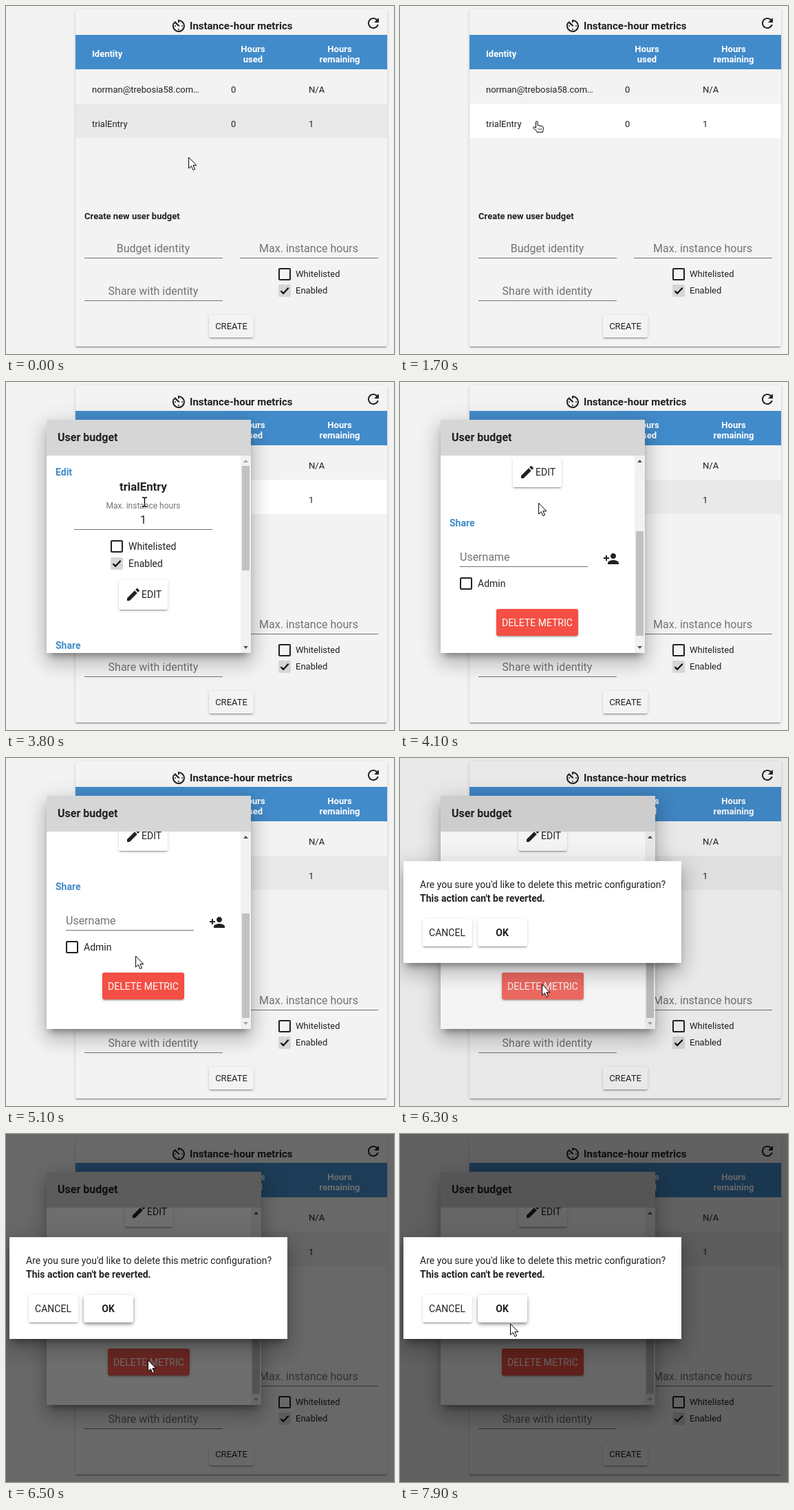
These frames come from a looping animation (564x506 px, 8000 ms). An HTML page:

```html
<!DOCTYPE html>
<html lang="en">
<head>
<meta charset="utf-8">
<title>Instance-hour metrics</title>
<style>
  html, body { margin: 0; width: 100%; height: 100%; overflow: hidden; background: #f3f3f3; }
  #stage { position: relative; width: 564px; height: 506px; overflow: hidden;
    font-family: Roboto, sans-serif; color: #212121; }
  #stage div, #stage svg { position: absolute; }
  .text { line-height: 20px; white-space: pre; }
  .mid { width: 240px; text-align: center; }
  .bold { font-weight: 700; }
  .white { color: #fff; }
  .blue { color: #428bca; }
  .hint { color: #737373; }
  .card, .btn { box-shadow: 0 2px 2px rgba(0,0,0,.14), 0 1px 5px rgba(0,0,0,.12), 0 3px 1px -2px rgba(0,0,0,.2); }
  .card { background: #f3f3f3; border-radius: 2px; }
  .btn { border-radius: 3px; background: #fff; overflow: hidden; }
  .raised { box-shadow: 0 4px 5px rgba(0,0,0,.14), 0 1px 10px rgba(0,0,0,.12), 0 2px 4px -1px rgba(0,0,0,.4); }
  .pale { background: #f3f3f3; }
  .red { background: #f44f44; }
  .head { background: #428bca; }
  .line { background: #737373; }
  .check { box-sizing: border-box; border: 2px solid #212121; border-radius: 2px; }
  .on { border: 0; background: #d6d6d6; }
  .dialog { background: #fff;
    box-shadow: 0 16px 24px 2px rgba(0,0,0,.14), 0 6px 30px 5px rgba(0,0,0,.12), 0 8px 10px -5px rgba(0,0,0,.4); }
  .bar { background: #d6d6d6; }
  .clip { overflow: hidden; }
  .track { background: #f1f1f1; }
  .thumb { background: #c1c1c1; }
  .ripple { border-radius: 50%; background: #fff; }
  .shade { background: #000; }
</style>
</head>
<body>
<div id="stage"></div>
<script>
const LOOP = 8000;
const stage = document.getElementById('stage');

function box(parent, x, y, w, h, cls = '') {
  const el = document.createElement('div');
  el.className = cls;
  el.style.cssText = `left:${x}px;top:${y}px;width:${w}px;height:${h}px`;
  return parent.appendChild(el);
}

// y is the middle of the line; "mid" text is centred on x
function text(parent, str, x, y, size, cls = '') {
  const el = document.createElement('div');
  const left = cls.includes('mid') ? x - 120 : x;
  el.className = 'text ' + cls;
  el.textContent = str;
  el.style.cssText = `left:${left}px;top:${y - 10}px;font-size:${size}px`;
  return parent.appendChild(el);
}

function svg(parent, x, y, w, h, inner) {
  parent.insertAdjacentHTML('beforeend',
    `<svg width="${w}" height="${h}" viewBox="0 0 ${w} ${h}" style="left:${x}px;top:${y}px" fill="#212121">${inner}</svg>`);
  return parent.lastElementChild;
}

const icon = (parent, x, y, d) => svg(parent, x, y, 24, 24, `<path d="${d}"/>`);

function field(parent, hint, x, y) {
  text(parent, hint, x + 100, y - 13, 16, 'mid hint');
  box(parent, x, y, 201, 1, 'line');
}

function check(parent, label, x, y, size, on, gap) {
  const el = box(parent, x, y, 18, 18, 'check' + (on ? ' on' : ''));
  if (on) svg(el, 0, 0, 18, 18, '<path d="M3.5 9.2l3.6 3.6 7.6-8" fill="none" stroke="#111" stroke-width="2.2"/>');
  text(parent, label, x + gap, y + 9, size);
}

const EMAIL = 'norman@trebosia58.com…';
const USER = 'trialEntry';

// Metrics card
box(stage, 101, 5, 453, 490, 'card');
svg(stage, 239, 17, 24, 24, `
  <path d="M12 7V4a8 8 0 1 1-6.2 2.9" fill="none" stroke="#212121" stroke-width="2"/>
  <path d="M6.6 4.8l6.8 6.8L12 13 5.6 7.2z"/>
  <circle cx="12" cy="17" r="1"/><circle cx="17" cy="12" r="1"/><circle cx="7" cy="12" r="1"/>`);
text(stage, 'Instance-hour metrics', 267, 29, 15, 'bold');
icon(stage, 522, 13, 'M17.65 6.35C16.2 4.9 14.21 4 12 4c-4.42 0-7.99 3.58-7.99 8s3.57 8 7.99 8c3.73 0 6.84-2.55 7.73-6h-2.08c-.82 2.33-3.04 4-5.65 4-3.31 0-6-2.69-6-6s2.69-6 6-6c1.66 0 3.14.69 4.22 1.78L13 11h7V4l-2.35 2.35z');

box(stage, 101, 42, 453, 50, 'head');
text(stage, 'Identity', 125, 70, 13, 'bold white');
[['Hours', 359, 63], ['used', 359, 78], ['Hours', 485, 63], ['remaining', 485, 78]]
  .forEach(([s, x, y]) => text(stage, s, x, y, 13, 'bold white mid'));

const row = box(stage, 101, 142, 453, 50);
[[EMAIL, '0', 'N/A'], [USER, '0', '1']].forEach((cells, i) =>
  cells.forEach((s, j) => text(stage, s, [125, 327, 440][j], 122 + 50 * i, 13)));

text(stage, 'Create new user budget', 114, 306, 13, 'bold');
field(stage, 'Budget identity', 114, 366);
field(stage, 'Max. instance hours', 340, 366);
field(stage, 'Share with identity', 114, 428);
check(stage, 'Whitelisted', 396, 381, 13, false, 25);
check(stage, 'Enabled', 396, 405, 13, true, 25);
box(stage, 295, 449, 65, 33, 'btn pale');
text(stage, 'CREATE', 327.5, 466, 13, 'mid');

// User budget dialog; its content uses stage coordinates
const dialog = box(stage, 59, 55, 297, 339, 'dialog');
const bar = box(dialog, 0, 0, 297, 52, 'bar');
text(bar, 'User budget', 16, 26, 16, 'bold');
const clip = box(dialog, 0, 52, 297, 287, 'clip');
const content = box(clip, -59, -107, 400, 600);

text(content, 'Edit', 72, 131, 14, 'bold blue');
text(content, USER, 199.5, 152, 16.8, 'bold mid');
text(content, 'Max. instance hours', 199.5, 180, 12, 'hint mid');
text(content, '1', 199.5, 201, 16, 'mid');
box(content, 99, 214, 201, 1, 'line');
check(content, 'Whitelisted', 152, 230, 14, false, 26);
check(content, 'Enabled', 152, 255, 14, true, 26);
box(content, 164, 288, 71, 43, 'btn');
icon(content, 173, 297, 'M3 17.25V21h3.75L17.81 9.94l-3.75-3.75L3 17.25zM20.71 7.04c.39-.39.39-1.02 0-1.41l-2.34-2.34c-.39-.39-1.02-.39-1.41 0l-1.83 1.83 3.75 3.75 1.83-1.83z');
text(content, 'EDIT', 197, 309, 14);
text(content, 'Share', 72, 383, 14, 'bold blue');
text(content, 'Username', 87, 433, 16, 'hint');
box(content, 87, 446, 186, 1, 'line');
icon(content, 295, 423, 'M15 12c2.21 0 4-1.79 4-4s-1.79-4-4-4-4 1.79-4 4 1.79 4 4 4zm-9-2V7H4v3H1v2h3v3h2v-3h3v-2H6zm9 4c-2.67 0-8 1.34-8 4v2h16v-2c0-2.66-5.33-4-8-4z');
check(content, 'Admin', 87, 462, 14, false, 26);
const del = box(content, 140, 508, 119, 39, 'btn red');
const ripple = box(del, 0, 0, 0, 0, 'ripple');
text(content, 'DELETE METRIC', 199.5, 528, 14, 'mid white');

const track = box(clip, 282, 0, 15, 287, 'track');
const thumb = box(track, 2, 15, 11, 152, 'thumb');
const up = svg(track, 0, 0, 15, 15, '<path d="M4 10l3.5-4 3.5 4z"/>');
const down = svg(track, 0, 272, 15, 15, '<path d="M4 5l3.5 4 3.5-4z"/>');

// Confirmation
const shade = box(stage, 0, 0, 564, 506, 'shade');
const confirmBox = box(stage, 5, 150, 404, 148, 'dialog');
text(confirmBox, "Are you sure you'd like to delete this metric configuration?", 24, 34, 14);
text(confirmBox, "This action can't be reverted.", 24, 54, 14, 'bold');
box(confirmBox, 28, 84, 72, 40, 'btn');
text(confirmBox, 'CANCEL', 63.5, 104, 14, 'mid');
const ok = box(confirmBox, 108, 84, 72, 40, 'btn');
text(confirmBox, 'OK', 143.5, 104, 14, 'mid bold');

// Pointers, each with the offset of its hot spot
const beam = 'M1 1h2.5l1 1 1-1H8M4.5 2v11M1 14h2.5l1-1 1 1H8';
const pointers = {
  arrow: { dx: 0, dy: 0, art: '<path d="M.6 1v16l3.7-3.4 2.7 6 2.6-1.2-2.7-5.7h5z" fill="#fff" stroke="#000"/>' },
  hand: { dx: -6, dy: 0, art: `<path d="M4.5 9V1.9a1.3 1.3 0 0 1 2.6 0v4.6l6 1.2q2.3.5 2.3 2.5v2.3q0 1.5-.8 2.6v1.3H6v-1.2L1 10.8q-.9-1.4.4-2t3.1 1.7z" fill="#fff" stroke="#000"/>
    <path d="M8 11v2M10.3 11v2M12.6 11v2" stroke="#000" stroke-width=".8"/>` },
  beam: { dx: -4, dy: -7, art: `<path d="${beam}" fill="none" stroke="#fff" stroke-width="2.4"/><path d="${beam}" fill="none" stroke="#000" stroke-width="1.3"/>` }
};
for (const p of Object.values(pointers)) p.el = svg(stage, 0, 0, 18, 21, p.art);

// Steps: [time, value...], each held until the next
const steps = {
  pointer: [
    [0, 'arrow', 265, 219], [1200, 'arrow', 262, 217], [1300, 'arrow', 252, 209],
    [1400, 'arrow', 236, 196], [1500, 'hand', 219, 182], [1600, 'hand', 206, 172],
    [1700, 'hand', 199, 167], [3800, 'beam', 201, 174], [4100, 'arrow', 201, 175],
    [4700, 'arrow', 198, 180], [4800, 'arrow', 187, 204], [4900, 'beam', 178, 237],
    [5000, 'arrow', 180, 264], [5100, 'arrow', 188, 287], [5200, 'arrow', 196, 303],
    [5300, 'hand', 203, 318], [5400, 'hand', 208, 326], [5500, 'hand', 206, 329],
    [6300, 'arrow', 206, 328], [7700, 'arrow', 201, 322], [7800, 'arrow', 178, 296],
    [7900, 'arrow', 160, 275]
  ],
  row: [[0, '#e9e9e9'], [1500, '#fff'], [3900, '#e9e9e9']],
  dialog: [[0, 0], [2700, .35], [2800, .8], [2900, 1]],
  scroll: [[0, 0], [3900, 34], [4000, 110], [4100, 178], [4200, 196]],
  ripple: [[0, 0, 0], [6100, 22, .2], [6200, 60, .2], [6300, 130, .17], [6400, 130, .14], [6500, 130, .05], [6600, 0, 0]],
  shade: [[0, 0], [6300, .045], [6400, .44], [6500, .57], [6600, .6]]
};

function at(name, t) {
  const list = steps[name];
  let i = list.length - 1;
  while (list[i][0] > t) i--;
  return list[i].slice(1);
}

function draw(t) {
  const [kind, x, y] = at('pointer', t);
  for (const [name, p] of Object.entries(pointers)) {
    p.el.style.display = name === kind ? '' : 'none';
    p.el.style.left = x + p.dx + 'px';
    p.el.style.top = y + p.dy + 'px';
  }

  row.style.background = at('row', t)[0];
  dialog.style.opacity = at('dialog', t)[0];
  shade.style.opacity = at('shade', t)[0];

  const asking = t >= 6300;
  const width = asking ? 312 : 297;
  for (const el of [dialog, bar, clip]) el.style.width = width + 'px';
  track.style.left = width - 15 + 'px';
  confirmBox.style.display = asking ? '' : 'none';
  ok.classList.toggle('raised', t >= 6400);

  const [scroll] = at('scroll', t);
  content.style.left = (asking ? -51 : -59) + 'px';
  content.style.top = -107 - scroll + 'px';
  thumb.style.top = 15 + Math.round(scroll * .531) + 'px';
  up.style.fill = scroll > 0 ? '#505050' : '#a3a3a3';
  down.style.fill = scroll < 196 ? '#505050' : '#a3a3a3';

  const [r, alpha] = at('ripple', t);
  ripple.style.cssText = `left:${66 - r}px;top:${17 - r}px;width:${2 * r}px;height:${2 * r}px;opacity:${alpha}`;
}

const start = performance.now();
function tick() {
  draw((performance.now() - start) % LOOP);
  requestAnimationFrame(tick);
}
tick();
</script>
</body>
</html>
```
